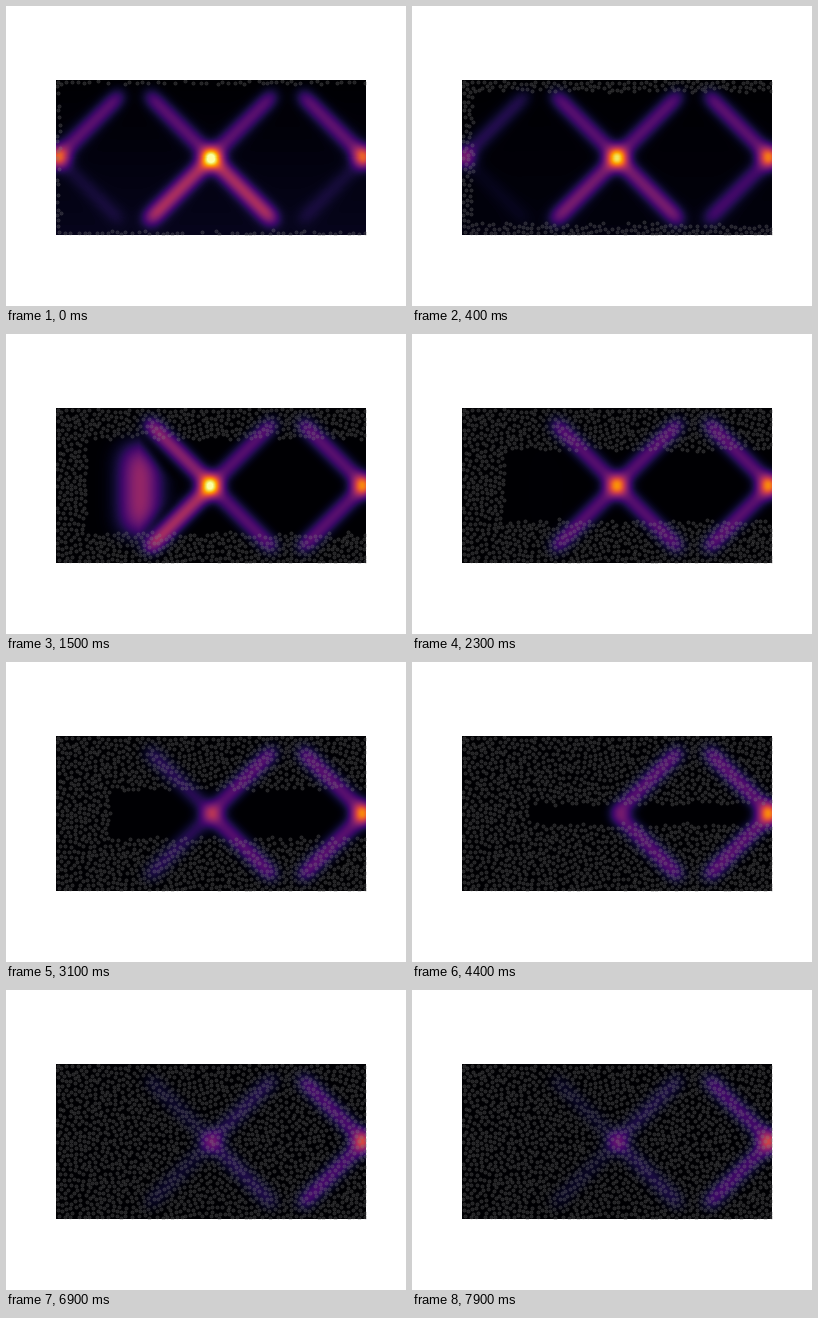
Write a matplotlib script that moves like this. It is 400 px wide and 300 px high and loops after 8000 ms.

```python
import numpy as np
import matplotlib.pyplot as plt
from matplotlib.animation import FuncAnimation

W, H = 310, 155
FRAMES, STEP = 80, 100
MID = 78
LEFT, CENTRE, RIGHT = 2, 155, 308
rng = np.random.default_rng(4)
X, Y = np.meshgrid(np.arange(W) + 0.5, np.arange(H) + 0.5)


def spot(cx, cy=MID, s=7.5):
    return np.exp(-((X - cx) ** 2 + (Y - cy) ** 2) / (2 * s * s))


def arm(cx, dx, dy, reach=62, s=6.6):
    """Soft diagonal stroke from a crossing point outwards, 1.0 along its core."""
    n = 36
    total = sum(spot(cx + dx * r, MID + dy * r, s) for r in np.linspace(0, reach, n))
    gap = reach * np.sqrt(2) / (n - 1)
    return total * gap / (s * np.sqrt(2 * np.pi))


def fan():
    """Glow with a flat left side that narrows to the right."""
    half = np.clip(44 - 0.9 * np.maximum(X - 83, 0), 12, None)
    return np.exp(-((X - 84) / 21) ** 2 - ((Y - 82) / half) ** 4)


def rise(t, start, end):
    u = np.clip((t - start) / (end - start), 0, 1)
    return u * u * (3 - 2 * u)


def fall(t, start, end):
    return 1 - rise(t, start, end)


def pulse(t, at, width=0.4):
    return np.exp(-((t - at) / width) ** 2)


left_spot, centre_spot, right_spot = map(spot, (LEFT, CENTRE, RIGHT))
left_up, left_down = (arm(LEFT, 1, dy) for dy in (-1, 1))
back_up, back_down = (arm(CENTRE, -1, dy) for dy in (-1, 1))
fore_up, fore_down = (arm(CENTRE, 1, dy) for dy in (-1, 1))
right_up, right_down = (arm(RIGHT, -1, dy) for dy in (-1, 1))
glow = fan()


def field(t):
    start, burst = pulse(t, 0), pulse(t, 1.5)
    fade = fall(t, 0, 0.8)
    back = 0.24 * fall(t, 2.2, 4.2) + 0.08 * rise(t, 4.6, 5.6) - 0.02 * rise(t, 6, 8)
    fore = 0.24 - 0.11 * rise(t, 4.6, 5.8) - 0.02 * rise(t, 6, 8)
    right = 0.25 - 0.05 * rise(t, 4.6, 7.9)
    core = 0.3 * fall(t, 1.5, 3.6) + 0.09 * rise(t, 4.6, 5.6)
    return (
        fade * (0.44 * left_spot + 0.24 * left_up + 0.06 * left_down + 0.05 * Y / H)
        + core * centre_spot
        + (back + 0.12 * burst) * back_up
        + (back + 0.17 * start + 0.20 * burst) * back_down
        + fore * fore_up
        + (fore + 0.17 * start) * fore_down
        + (0.43 - 0.12 * rise(t, 4.6, 5.8)) * right_spot
        + right * right_up
        + right * (1 - 0.75 * start) * right_down
        + 0.40 * burst * glow
    )


def scatter_points(gap=4.0, tries=36000):
    """Random points that keep a minimum distance from each other."""
    pts = np.empty((tries, 2))
    n = 0
    for p in rng.uniform((1, 1), (W, H - 1), (tries, 2)):
        d = pts[:n] - p
        if n == 0 or (d * d).sum(axis=1).min() > gap * gap:
            pts[n] = p
            n += 1
    return pts[:n]


points = scatter_points()
px, py = points.T
depth = np.minimum(px, np.minimum(py, H - py)) + rng.normal(0, 0.8, len(points))
order = np.argsort(depth)
points, depth = points[order], depth[order]


def front(t):
    """How far the dots have grown inwards; slows down until the gap is closed."""
    t = min(t, 6)
    return 4 + 19.2 * t - 1.05 * t * t


fig, ax = plt.subplots(figsize=(4, 3), dpi=100)
ax.axis("off")
image = ax.imshow(field(0), cmap="inferno", vmin=0, vmax=1,
                  extent=(0, W, H, 0), interpolation="nearest")
dots = ax.scatter(px, py, s=6, color="gray", alpha=0.27, linewidths=0.4)
ax.set_xlim(0, W)
ax.set_ylim(H, 0)


def update(i):
    t = i * STEP / 1000
    image.set_data(field(t))
    dots.set_offsets(points[:np.searchsorted(depth, front(t))])
    return image, dots


anim = FuncAnimation(fig, update, frames=FRAMES, interval=STEP,
                     repeat=True, repeat_delay=0)
plt.show()
```
